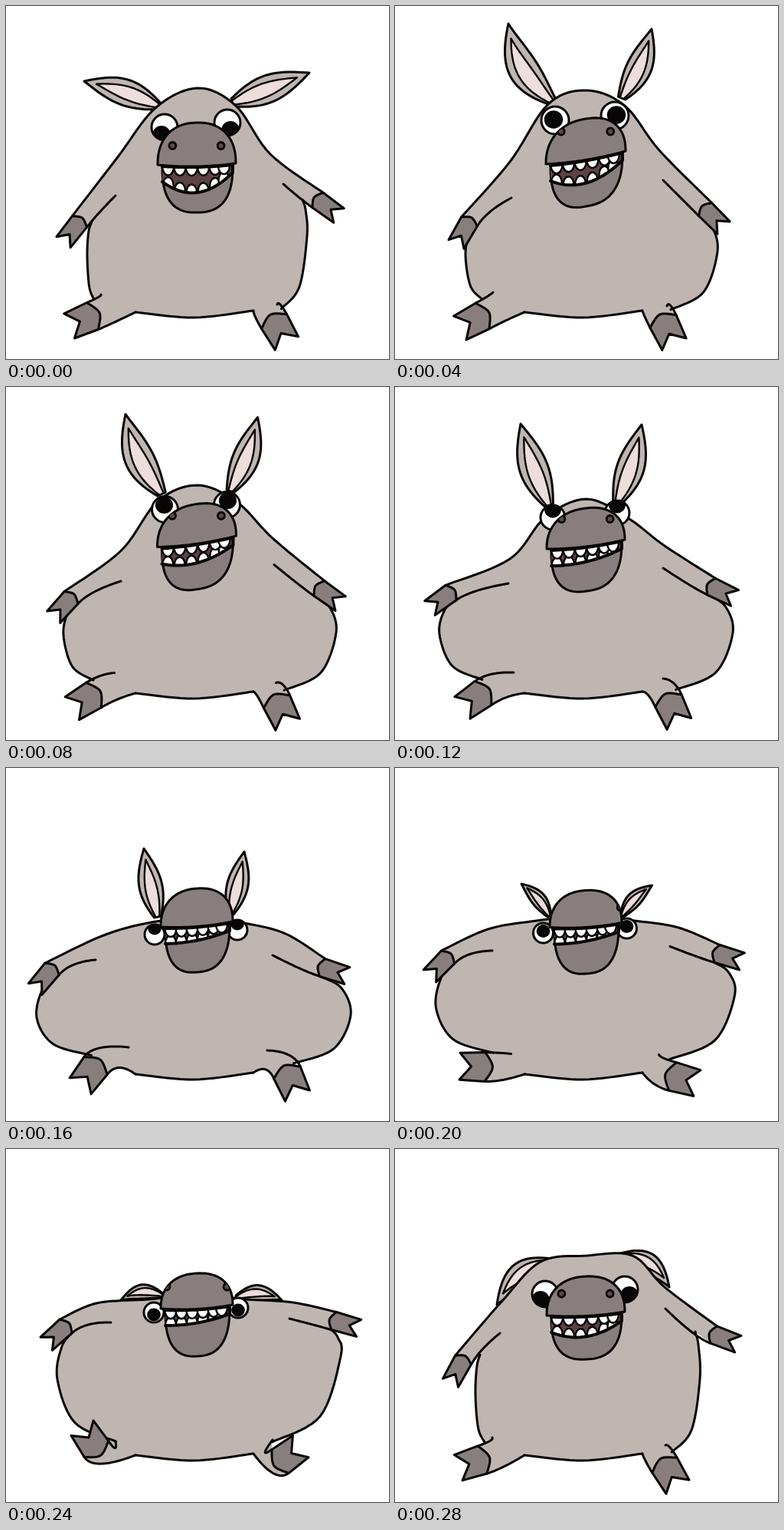
Write an HTML page with a canvas that moves like this. It is 500 px wide and 460 px high and loops after 320 ms.

```html
<!DOCTYPE html>
<html lang="en">
<head>
<meta charset="utf-8">
<title>Bouncing creature</title>
<style>
html, body { margin: 0; width: 100%; height: 100%; overflow: hidden; background: #fff; }
canvas { display: block; }
</style>
</head>
<body>
<canvas id="stage" width="500" height="460"></canvas>
<script>
const ctx = document.getElementById('stage').getContext('2d');
const INK = '#080505', SKIN = '#bfb6b1', DARK = '#897e7e', PINK = '#eddddd', MOUTH = '#5d4343';
const LINE = 3, STEP = 40, CENTRE = 249;
const BELLY = [[169, 399], [245, 406], [323, 397]];
const HAND = { width: 24, length: 34, cleft: 21, spread: 23, bend: 6 };
const FOOT = { width: 38, length: 33, cleft: 18, spread: 35, bend: 10 };

// head: shoulder, cheek, crown, cheek, shoulder
// arms, feet: per side joint x, y, hoof angle, then the inner end of the crease
// waist: widest points; ears: per side root, tip, outward bend
// muzzle: half width, lip height left and right, top, chin, jaw sag
// nostrils: spread, height; eyes: spread, y, radius, gaze outward and down
const POSES = [
  { head: [[145, 198], [195, 133], [250, 107], [300, 130], [345, 193]],
    arms: [[96, 281, 128, 143, 247], [407, 253, 36, 362, 232]],
    feet: [[113, 404, 157, 124, 376], [350, 411, 60, 354, 389]],
    waist: [[106, 325], [393, 300]], ears: [[199, 130, 102, 98, -3], [296, 126, 396, 87, 0]],
    muzzle: [51, 207, 205, 152, 267, 25], nostrils: [.31, 24], eyes: [41, 155, 17, 4, 9] },
  { head: [[150, 203], [200, 128], [250, 110], [300, 130], [345, 188]],
    arms: [[97, 281, 120, 152, 250], [405, 265, 45, 350, 227]],
    feet: [[114, 404, 152, 128, 373], [350, 411, 64, 355, 391]],
    waist: [[92, 325], [421, 320]], ears: [[205, 125, 148, 23, 12], [296, 120, 335, 30, 5]],
    muzzle: [52, 206, 189, 147, 259, 20], nostrils: [.31, 34], eyes: [39, 146, 18, 2, -1] },
  { head: [[150, 224], [196, 170], [250, 146], [303, 170], [352, 207]],
    arms: [[73, 268, 144, 148, 256], [413, 260, 26, 350, 236]],
    feet: [[115, 399, 145, 155, 372], [357, 409, 65, 350, 380]],
    waist: [[58, 322], [441, 320]], ears: [[201, 154, 164, 48, 3], [290, 151, 322, 49, 3]],
    muzzle: [51, 211, 199, 158, 264, 7], nostrils: [.31, 33], eyes: [42, 167, 16, 0, -10] },
  { head: [[125, 219], [185, 202], [250, 195], [310, 202], [365, 216]],
    arms: [[60, 262, 130, 117, 250], [413, 260, 18, 348, 244]],
    feet: [[117, 388, 127, 160, 364], [367, 397, 66, 341, 368]],
    waist: [[40, 325], [450, 322]], ears: [[198, 194, 180, 105, 1], [293, 190, 311, 109, 1]],
    muzzle: [47, 207, 200, 157, 264, 5], nostrils: [.55, 20], eyes: [54, 214, 13, 0, -8] },
  { head: [[118, 201], [185, 196], [250, 190], [315, 196], [375, 200]],
    arms: [[78, 231, 138, 137, 226], [428, 224, 16, 370, 221]],
    feet: [[118, 391, 236, 143, 381], [358, 407, -36, 348, 379]],
    waist: [[67, 300], [437, 270]], ears: [[205, 191, 150, 197, -8], [300, 194, 360, 197, -8]],
    muzzle: [47, 208, 203, 162, 268, 5], nostrils: [.42, 26], eyes: [55, 210, 13, 0, 3] },
  { head: [[140, 198], [190, 147], [250, 139], [310, 139], [352, 180]],
    arms: [[89, 275, 119, 137, 240], [416, 242, 21, 353, 208]],
    feet: [[114, 405, 162, 127, 376], [352, 412, 59, 353, 386]],
    waist: [[105, 320], [398, 300]], ears: [[209, 147, 133, 203, -13], [293, 139, 358, 180, -12]],
    muzzle: [51, 217, 212, 166, 272, 16], nostrils: [.31, 26], eyes: [52, 186, 17, 6, 7] }
];
// Key pose shown at each step; halves lie midway between two poses.
const SCHEDULE = [0, 1, 1.5, 2, 3, 3.5, 4, 5];

// Blends numbers, points, or whole poses
function mix(a, b, t) {
  if (typeof a === 'number') return a + (b - a) * t;
  if (Array.isArray(a)) return a.map((v, i) => mix(v, b[i], t));
  return Object.fromEntries(Object.keys(a).map(k => [k, mix(a[k], b[k], t)]));
}
const poseAt = key => mix(POSES[Math.floor(key)], POSES[Math.ceil(key)], key % 1);
const offset = (p, d, amount) => [p[0] + d[0] * amount, p[1] + d[1] * amount];
const sample = (fn, n = 24) => Array.from({ length: n + 1 }, (_, i) => fn(i / n));
const bezier = (a, b, c) => sample(t => mix(mix(a, b, t), mix(b, c, t), t));

// Catmull-Rom curve as a dense polyline
function spline(pts) {
  const at = i => pts[Math.max(0, Math.min(pts.length - 1, i))];
  return pts.slice(1).flatMap((_, i) => {
    const [a, b, c, d] = [at(i - 1), at(i), at(i + 1), at(i + 2)];
    return sample(t => [0, 1].map(k => b[k] + t * (c[k] - a[k] +
      t * (2 * a[k] - 5 * b[k] + 4 * c[k] - d[k] + t * (3 * (b[k] - c[k]) + d[k] - a[k]))) / 2), 10);
  });
}

// Half superellipse standing on the line from left to right
function arch(left, right, height, power) {
  return sample(t => {
    const x = -Math.cos(Math.PI * t);
    const rise = (1 - Math.abs(x) ** power) ** (1 / power);
    return offset(mix(left, right, (x + 1) / 2), [0, -1], height * rise);
  }, 40);
}

function paint(fill, width) {
  if (fill) { ctx.fillStyle = fill; ctx.fill(); }
  if (width) { ctx.lineWidth = width; ctx.stroke(); }
}

function shape(pts, fill, width = LINE) {
  ctx.beginPath();
  pts.forEach(p => ctx.lineTo(...p));
  if (fill) ctx.closePath();
  paint(fill, width);
}

function oval([x, y], rx, ry, fill, width = LINE) {
  ctx.beginPath();
  ctx.ellipse(x, y, rx, ry, 0, 0, Math.PI * 2);
  paint(fill, width);
}

function clipped(outline, drawInside) {
  ctx.save();
  outline();
  ctx.clip();
  drawInside();
  ctx.restore();
}

function drawEar([rootX, rootY, tipX, tipY, bend], side) {
  const dx = tipX - rootX, dy = tipY - rootY, length = Math.hypot(dx, dy);
  const normal = [dy / length, -dx / length];
  const leaf = (reach, width) => {
    const edge = sign => sample(t => {
      const s = t * reach;
      const spine = offset([rootX + dx * s, rootY + dy * s], normal, side * bend * 4 * s * (1 - s));
      return offset(spine, normal, sign * width * length * Math.sin(Math.PI * (0.1 + 0.9 * t)));
    });
    return [...edge(1), ...edge(-1).reverse()];
  };
  shape(leaf(1, 0.165), SKIN);
  shape(leaf(0.84, 0.085), PINK, 2.4);
}

function makeLimb([x, y, degrees, creaseX, creaseY], side, kind) {
  const angle = degrees * Math.PI / 180;
  const dir = [Math.cos(angle), Math.sin(angle)], up = [-side * dir[1], side * dir[0]];
  const at = (along, across) => offset(offset([x, y], dir, along), up, across);
  const half = kind.width / 2, upper = at(0, half), lower = at(0, -half);
  const hoof = [upper, at(kind.length, kind.spread / 2), at(kind.cleft, 0),
    at(kind.length, -kind.spread / 2), ...spline([lower, at(-kind.bend, 0), upper])];
  const curveTo = (joint, end) => bezier(joint, offset(joint, dir, -22), end);
  return { upper, lower, hoof, curveTo, crease: [creaseX, creaseY] };
}

// Rounded flank from the underarm past the waist to the hip
function flank(arm, foot, waist, side) {
  const reach = (waist[0] + side * 6 - arm.crease[0]) / (arm.lower[0] - arm.crease[0]);
  const armpit = mix(arm.crease, arm.lower, Math.min(1, reach));
  const dx = foot.crease[0] - foot.upper[0], dy = foot.crease[1] - foot.upper[1];
  const hip = offset(foot.upper, [dx, dy], 10 / Math.hypot(dx, dy));
  const corner = p => [mix(p[0], waist[0], 0.7), mix(waist[1], p[1], 0.7)];
  return spline([armpit, corner(armpit), waist, corner(hip), hip]);
}

function drawBody({ head, arms, feet, waist }) {
  const sides = [1, -1];
  const [armL, armR] = sides.map((s, i) => makeLimb(arms[i], s, HAND));
  const [footL, footR] = sides.map((s, i) => makeLimb(feet[i], s, FOOT));
  const back = spline([armL.upper, ...head, armR.upper]);
  const flankL = flank(armL, footL, waist[0], 1), flankR = flank(armR, footR, waist[1], -1);
  const belly = spline(BELLY);
  const legL = footL.curveTo(footL.lower, BELLY[0]), legR = footR.curveTo(footR.lower, BELLY[2]);

  shape([...back, armR.lower, ...flankR, footR.upper, ...legR, ...[...belly].reverse(),
    ...[...legL].reverse(), footL.upper, ...[...flankL].reverse(), armL.lower], SKIN, 0);
  [back, flankL, flankR, belly, legL, legR].forEach(line => shape(line));
  shape(armL.curveTo(armL.lower, armL.crease));
  shape(armR.curveTo(armR.lower, armR.crease));
  shape(footL.curveTo(footL.upper, footL.crease));
  shape(footR.curveTo(footR.upper, footR.crease));
  [armL, armR, footL, footR].forEach(limb => shape(limb.hoof, DARK));
}

function drawEyes([spread, y, r, out, down]) {
  for (const side of [-1, 1]) {
    const centre = [CENTRE - 1 + side * spread, y - side * 3];
    clipped(() => oval(centre, r, r, '#fff', 0),
      () => oval(offset(centre, [side * out, down], 1), r * 0.68, r * 0.65, INK, 0));
    oval(centre, r, r);
  }
}

function drawTeeth(line, rx, ry) {
  for (let i = 0; i < 6; i++) {
    const spot = line[Math.round((0.07 + i * 0.165) * (line.length - 1))];
    oval(spot, rx, ry, '#fff', 2.4);
  }
}

function drawMuzzle([half, leftY, rightY, top, chin, sag], [spread, height]) {
  const left = [CENTRE - half, leftY], right = [CENTRE + half, rightY];
  const lipY = (leftY + rightY) / 2;
  const jawL = [left[0] + 6, leftY + 2], jawR = [right[0] - 4, rightY + 2];
  const lipCurve = (a, b, drop) => bezier(a, offset(mix(a, b, 0.5), [0, 1], drop * 2), b);
  const lip = lipCurve(jawL, jawR, 2);
  const rim = lipCurve(offset(jawL, [0, 1], 20), offset(jawR, [0, 1], 10), sag * 0.8);
  const opening = [...lip, ...[...rim].reverse()];

  shape(arch(jawL, jawR, lipY - chin, 2.6), DARK);
  clipped(() => shape(opening, MOUTH, 0), () => {
    drawTeeth(rim, 7, 11);
    drawTeeth(lip, 7.5, 11);
  });
  shape(opening, null, 4);

  const snout = [...arch(left, right, lipY - top, 2.3), ...lipCurve(right, left, 3)];
  shape(snout, DARK);
  clipped(() => shape(snout, null, 0), () => {
    for (const side of [-1, 1]) {
      oval([CENTRE + side * spread * half * 2, lipY - height], 4.5, 4.5, '#5b4a4b', 2.8);
    }
  });
}

function draw(pose) {
  ctx.fillStyle = '#fff';
  ctx.fillRect(0, 0, 500, 460);
  ctx.strokeStyle = INK;
  ctx.lineJoin = ctx.lineCap = 'round';
  drawEar(pose.ears[0], 1);
  drawEar(pose.ears[1], -1);
  drawBody(pose);
  drawEyes(pose.eyes);
  drawMuzzle(pose.muzzle, pose.nostrils);
}

const poses = SCHEDULE.map(poseAt);
const start = performance.now();
function tick() {
  const elapsed = performance.now() - start;
  draw(poses[Math.floor(elapsed / STEP) % poses.length]);
  requestAnimationFrame(tick);
}
tick();
</script>
</body>
</html>
```
